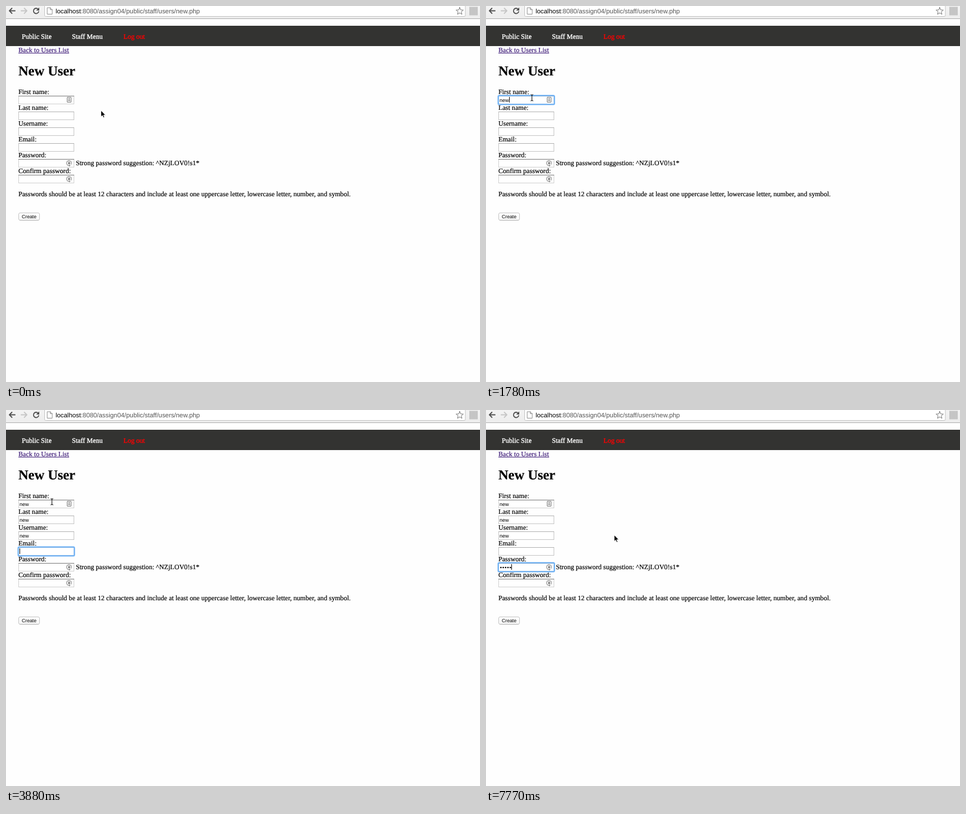
An HTML page for the animation above (8 s loop, 841x666 px).

```html
<!DOCTYPE html>
<html lang="en">
<head>
<meta charset="utf-8">
<title>New User</title>
<style>
  html, body { margin: 0; width: 100%; height: 100%; overflow: hidden; background: #fefefe; }
  svg { display: block; width: 100%; height: 100%; }
  text { font: 12.1px "Liberation Serif", "Times New Roman", serif; text-rendering: geometricPrecision; white-space: pre; stroke: #000; stroke-width: .2; }
  .sans { font-family: "Liberation Sans", Arial, sans-serif; stroke: none; }
  .nav text { fill: #fff; stroke: #fff; stroke-width: .35; }
  .nav .out { fill: #f00; stroke: #f00; }
  .link { fill: #3d1a78; stroke: #3d1a78; }
  .line { fill: none; stroke-linecap: round; stroke-linejoin: round; }
</style>
</head>
<body>
<svg viewBox="0 0 841 666">
  <defs>
    <linearGradient id="bar" x2="0" y2="1">
      <stop stop-color="#f3f3f3"/><stop offset="1" stop-color="#ededed"/>
    </linearGradient>
    <linearGradient id="face" x2="0" y2="1">
      <stop stop-color="#fff"/><stop offset="1" stop-color="#f6f6f6"/>
    </linearGradient>
  </defs>
  <rect width="841" height="666" fill="#fefefe"/>

  <!-- browser toolbar -->
  <rect width="841" height="22" fill="url(#bar)"/>
  <rect y="22" width="841" height="1" fill="#acacac"/>
  <path d="M68.5-2V16.5Q68.5 18.5 70.5 18.5H813Q815 18.5 815 16.5V-2Z" fill="#fff" stroke="#c2c2c2"/>
  <g class="line" stroke-width="1.8">
    <path d="M16 8.5H6.5M10.5 4L6 8.5L10.5 13" stroke="#505050"/>
    <path d="M27 8.5H36.5M32.5 4L37 8.5L32.5 13" stroke="#c6c6c6"/>
    <path d="M57 5.6A4.7 4.7 0 1 0 58 10" stroke="#505050"/>
  </g>
  <path d="M59 2.5V8H53.5Z" fill="#505050"/>
  <path class="line" d="M73.5 3H78.5L82 6.5V14.5H73.5ZM78.5 3V6.5H82" stroke="#8c8c8c"/>
  <text class="sans" x="88" y="12.7" style="font-size:11.39px" fill="#555"><tspan fill="#000">localhost</tspan>:8080/assign04/public/staff/users/new.php</text>
  <path id="star" class="line" stroke="#777"/>
  <rect x="822" y="1.5" width="15" height="15" fill="#c5c5c5"/>

  <!-- page -->
  <g class="nav">
    <rect y="35" width="841" height="36" fill="#333331"/>
    <text x="28" y="57.5">Public Site</text>
    <text x="117" y="57.5">Staff Menu</text>
    <text class="out" x="208.5" y="57.5">Log out</text>
  </g>
  <text class="link" x="22" y="82">Back to Users List</text>
  <rect class="link" x="22" y="83" width="90" height="1" stroke="none" style="stroke:none"/>
  <text x="22" y="123" style="font-size:24.4px;font-weight:bold">New User</text>
  <g id="form"></g>
  <text x="124" y="282">Strong password suggestion: ^NZjLOV0!s1*</text>
  <text x="22" y="336.5">Passwords should be at least 12 characters and include at least one uppercase letter, lowercase letter, number, and symbol.</text>
  <rect x="22.5" y="366.5" width="37" height="13" rx="2.5" fill="url(#face)" stroke="#c4c4c4"/>
  <path d="M24.5 379.5H57.5" stroke="#adadad"/>
  <text class="sans" x="28" y="376" style="font-size:8.7px">Create</text>

  <g id="ring" fill="none">
    <rect x="20.5" y="-1.5" width="102" height="18" rx="2.5" stroke="#d3e7fc"/>
    <rect x="21.8" y="-.2" width="99.4" height="15.4" rx="1.5" stroke="#6bb0f5" stroke-width="2"/>
  </g>
  <rect id="caret" width="1" height="10" fill="#000"/>
  <path id="arrow" d="M0 0V11.2L2.6 8.8L4.4 12.8L6.2 12L4.5 8.2H8Z" stroke="#fff" stroke-width=".8"/>
  <path id="beam" class="line" d="M-2-5Q0-5 0-3.6Q0-5 2-5M0-4V5M-2 6Q0 6 0 4.6Q0 6 2 6" stroke="#111" stroke-width="1.1"/>
</svg>

<script>
const LOOP = 8000;
const LABELS = ["First name:", "Last name:", "Username:", "Email:", "Password:", "Confirm password:"];
const PASSWORD = 4;
const DOT_PITCH = 4.2;
const TEXT_X = 24;
const byId = id => document.getElementById(id);
const fieldTop = i => 159 + 28 * i;

// [start ms, focused field, characters typed in it, caret shown]
const STEPS = [
  [0, -1, 0, 0],
  [740, 0, 0, 1], [1190, 0, 0, 0], [1630, 0, 2, 1], [1780, 0, 3, 1],
  [2080, 1, 0, 1], [2380, 1, 2, 1], [2530, 1, 3, 1],
  [2830, 2, 0, 1], [3280, 2, 2, 1], [3430, 2, 3, 1],
  [3880, 3, 0, 1], [4330, 3, 0, 0],
  [4630, 4, 0, 1], [5080, 4, 0, 0], [5530, 4, 0, 1],
  [6120, 4, 1, 1], [6270, 4, 2, 1], [6570, 4, 4, 1], [6720, 4, 5, 1],
  [7170, 4, 5, 0], [7770, 4, 5, 1]
];

// [start ms, x, y, pointer shape]
const POINTER = [
  [0, 168.5, 185, "arrow"], [150, 160, 183, "arrow"], [300, 130, 176, "arrow"],
  [450, 95, 166, "beam"], [590, 81.5, 162, "beam"],
  [4780, 125, 180, "arrow"], [4930, 205, 212, "arrow"], [5080, 227.5, 221.5, "arrow"]
];

const current = (list, t) => list.findLast(step => step[0] <= t);

function fieldIcon(i, y) {
  if (i === 0) return `<g fill="#eee" stroke="#7c7c7c"><rect x="108.5" y="${y + 2.5}" width="7" height="9" rx=".5"/>
    <path d="M112 ${y + 4}V${y + 7}M110.5 ${y + 8.5}H113.5" stroke-width="1.4"/></g>`;
  return `<g fill="none" stroke="#8a8a8a" stroke-width="1.1"><path d="M113 ${y + 11.5}A4.4 4.4 0 1 1 115.5 ${y + 9.7}"/>
    <path d="M110.8 ${y + 6.5}V${y + 5.5}Q112 ${y + 3.6} 113.2 ${y + 5.5}V${y + 6.5}" stroke-width=".9"/></g>
    <rect x="110" y="${y + 6}" width="4" height="3.2" fill="#8a8a8a"/>
    <path d="M112 ${y + 9.6}V${y + 13.4}L114.6 ${y + 11.5}Z" fill="#8a8a8a"/>`;
}

function field(label, i) {
  const y = fieldTop(i);
  const managed = i === 0 || i >= PASSWORD;
  return `<text x="22" y="${y - 3}">${label}</text>
    <rect x="22.5" y="${y + .5}" width="98" height="14" fill="#fff" stroke="${managed ? "#cfcfcf" : "#c4c4c4"}"/>
    <path d="M22 ${y + .5}H121" stroke="${managed ? "#777" : "#b0b0b0"}"/>
    ${managed ? fieldIcon(i, y) : ""}
    <text class="sans value" x="${TEXT_X}" y="${y + 11}" style="font-size:9px"></text><g class="dots"></g>`;
}

function buildStar() {
  const points = Array.from({ length: 10 }, (_, k) => {
    const r = k % 2 ? 3 : 6.8, a = k * Math.PI / 5;
    return `${(805 + r * Math.sin(a)).toFixed(2)} ${(9.3 - r * Math.cos(a)).toFixed(2)}`;
  });
  byId("star").setAttribute("d", `M${points.join("L")}Z`);
}

byId("form").innerHTML = LABELS.map(field).join("");
buildStar();
const values = [...document.querySelectorAll(".value")];
const dots = document.querySelectorAll(".dots")[PASSWORD];
dots.innerHTML = Array.from({ length: 5 }, (_, k) =>
  `<circle cx="${TEXT_X + 2.4 + k * DOT_PITCH}" cy="${fieldTop(PASSWORD) + 8}" r="1.35"/>`).join("");

const show = (el, on) => el.setAttribute("visibility", on ? "visible" : "hidden");
const moveTo = (el, x, y) => el.setAttribute("transform", `translate(${x} ${y})`);

function render(t) {
  const [, focus, typed, caretOn] = current(STEPS, t);
  values.forEach((el, i) => {
    const length = i >= 3 ? 0 : i < focus ? 3 : i === focus ? typed : 0;
    el.textContent = "new".slice(0, length);
  });
  const dotCount = focus === PASSWORD ? typed : 0;
  [...dots.children].forEach((dot, k) => show(dot, k < dotCount));

  show(byId("ring"), focus >= 0);
  show(byId("caret"), caretOn);
  if (focus >= 0) {
    const y = fieldTop(focus);
    const width = focus === PASSWORD ? dotCount * DOT_PITCH : values[focus].getComputedTextLength();
    moveTo(byId("ring"), 0, y);
    moveTo(byId("caret"), Math.round(TEXT_X + width), y + 2);
  }

  const [, x, y, shape] = current(POINTER, t);
  for (const name of ["arrow", "beam"]) {
    show(byId(name), name === shape);
    moveTo(byId(name), x, y);
  }
}

const start = performance.now();
function tick() {
  render((performance.now() - start) % LOOP);
  requestAnimationFrame(tick);
}
tick();
</script>
</body>
</html>
```
